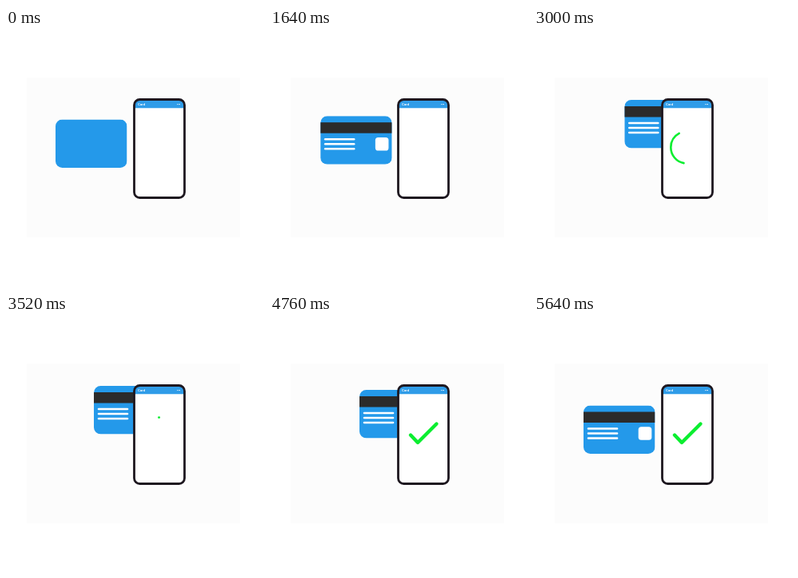
An HTML page that plays this animation: 323 px wide and 323 px high, repeating every 9000 ms.

```html
<!DOCTYPE html>
<html lang="en">
<head>
<meta charset="utf-8">
<title>Card payment</title>
<style>
  html, body { margin: 0; width: 100%; height: 100%; overflow: hidden; background: #fff; }
  svg { display: block; width: 100%; height: 100%; }
  text { font: 700 4px "Liberation Sans", Arial, sans-serif; fill: #fff; }
  .bar { stroke: #fff; stroke-width: 2.6; stroke-linecap: round; }
  .green { fill: none; stroke: #0bee30; stroke-linecap: round; stroke-linejoin: round; }
</style>
</head>
<body>
<svg viewBox="0 0 323 323">
  <defs>
    <clipPath id="cardShape"><rect width="89.5" height="60.5" rx="8.5"/></clipPath>
  </defs>
  <rect x="26" y="62" width="267" height="200" fill="#fcfcfc"/>
  <g id="card">
    <g clip-path="url(#cardShape)">
      <rect width="89.5" height="60.5" fill="#2499ea"/>
      <rect id="stripe" y="8" height="13.5" fill="#2b2b2b"/>
      <line class="bar" y1="29" y2="29"/>
      <line class="bar" y1="35" y2="35"/>
      <line class="bar" y1="41" y2="41"/>
      <rect id="chip" x="-8.3" y="-8.3" width="16.6" height="16.6" rx="3.6" fill="#fff"/>
    </g>
  </g>
  <rect x="160.5" y="89.5" width="63" height="123" rx="7" fill="#fff"/>
  <path d="M161 100.3V95q0-4 4-4h54q4 0 4 4v5.3z" fill="#2f9ce8"/>
  <text x="165" y="97.4">Card</text>
  <text x="214" y="97.4">•••</text>
  <rect x="160.5" y="89.5" width="63" height="123" rx="7" fill="none" stroke="#1e1820" stroke-width="2.8"/>
  <circle id="spinner" class="green" cx="191.3" cy="149.5" r="20" stroke-width="2.6" pathLength="360" transform="rotate(-90 191.3 149.5)"/>
  <path id="check" class="green" d="M176 151.5l9 9.5 23.5-23.5" stroke-width="4.4" pathLength="100"/>
</svg>
<script>
const LOOP = 9000, STEP = 40;
const $ = id => document.getElementById(id);
const bars = document.querySelectorAll('.bar');

const cardX = [[1480, 62], [1840, 68.5], [2040, 84], [2320, 107], [2600, 114], [3000, 113.3],
  [3520, 110], [3680, 106.5], [3920, 103.5], [4280, 108.5], [4600, 114], [4760, 112],
  [5160, 82], [5440, 62.5], [5640, 62]];
const cardY = [[1480, 114.5], [1840, 100.5], [2040, 93], [2280, 90], [4560, 90], [4760, 95],
  [5000, 108], [5280, 122], [5520, 117.3], [5640, 114.5]];

const progress = (t, from, to) => Math.min(1, Math.max(0, (t - from) / (to - from)));
const ease = p => p < .5 ? 2 * p * p : 1 - 2 * (1 - p) ** 2;
const eased = (t, from, to) => ease(progress(t, from, to));

// Slope at a key: flat at ends and turning points
function slope(keys, i) {
  const a = keys[i - 1], b = keys[i], c = keys[i + 1];
  if (!a || !c || (b[1] - a[1]) * (c[1] - b[1]) <= 0) return 0;
  return (c[1] - a[1]) / (c[0] - a[0]);
}

function curve(keys, t) {
  if (t <= keys[0][0]) return keys[0][1];
  const i = keys.findIndex(k => k[0] > t) - 1;
  if (i < 0) return keys[keys.length - 1][1];
  const [t0, a] = keys[i], [t1, b] = keys[i + 1], d = t1 - t0, p = (t - t0) / d;
  const s = p * p * (3 - 2 * p);
  return a + (b - a) * s
    + d * p * (1 - p) * ((1 - p) * slope(keys, i) - p * slope(keys, i + 1));
}

function dash(el, from, to) {
  el.style.visibility = to > from ? 'visible' : 'hidden';
  el.setAttribute('stroke-dasharray', `${to - from} 1000`);
  el.setAttribute('stroke-dashoffset', -from);
}

function draw(t) {
  $('card').setAttribute('transform', `translate(${curve(cardX, t)} ${curve(cardY, t)})`);
  $('stripe').setAttribute('width', 89.5 * eased(t, 0, 780));

  bars.forEach((bar, i) => {
    const p = eased(t, 840 + i * 110, 1200 + i * 110);
    bar.setAttribute('x1', 2 + 4 * p);
    bar.setAttribute('x2', 12 + 30 * p);
    bar.setAttribute('opacity', Math.min(1, p * 2.5));
  });

  const size = 1.36 - .36 * eased(t, 880, 1200);
  $('chip').setAttribute('transform', `translate(77 35) scale(${size})`);
  $('chip').setAttribute('opacity', progress(t, 720, 1000));

  const start = t < 3490 ? 2480 : 3490;
  dash($('spinner'), 360 * eased(t, start + 200, start + 820), 360 * eased(t, start, start + 650));
  dash($('check'), 0, 100 * eased(t, 4340, 4700));
}

const begin = performance.now();
function tick() {
  const t = (performance.now() - begin) % LOOP;
  draw(Math.floor(t / STEP) * STEP);
  requestAnimationFrame(tick);
}
tick();
</script>
</body>
</html>
```
